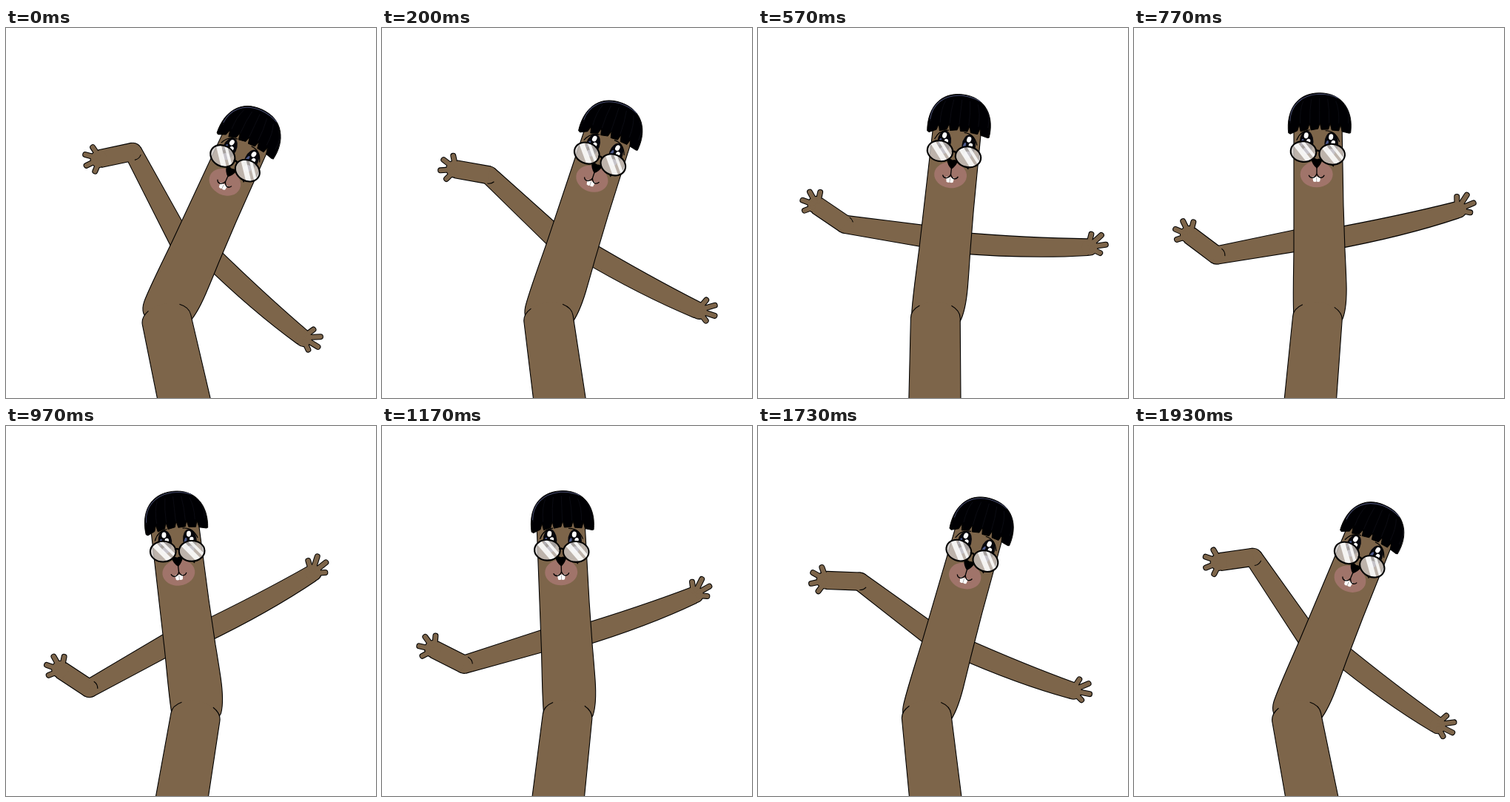
An HTML page with a canvas for the animation above (1960 ms loop, 500 px wide and 500 px high).

```html
<!DOCTYPE html>
<html lang="en">
<head>
<meta charset="utf-8">
<title>Waving tube dancer</title>
<style>
  html, body { margin: 0; width: 100%; height: 100%; overflow: hidden; background: #fff; }
  canvas { display: block; width: 500px; height: 500px; }
</style>
</head>
<body>
<canvas id="stage" width="500" height="500"></canvas>
<script>
const ctx = document.getElementById('stage').getContext('2d');
const LOOP = 1960, TURN = 30;
const INK = '#000', SKIN = '#7d654a';
const rad = d => d * Math.PI / 180;
const shape = d => new Path2D(d);

function oval(x, y, rx, ry = rx, tilt = 0) {
  const p = new Path2D();
  p.ellipse(x, y, rx, ry, rad(tilt), 0, 7);
  return p;
}
function fill(path, color) {
  ctx.fillStyle = color;
  ctx.fill(path);
}
function line(path, width, color = INK) {
  ctx.strokeStyle = color;
  ctx.lineWidth = width;
  ctx.stroke(path);
}

// u swings 0..30..0; lag separates the way out from the way back.
const rightArm = (u, lag) => ({
  side: 1,
  x: 288 + 0.3 * u - 0.02 * u * u,
  y: 318 - 1.6 * u,
  segments: [{ angle: 41.6 - 2.42 * u + 1.5 * lag, len: 151 + 8 * lag, from: 27.5, to: 21.5, bow: 3 }],
  hand: { palm: 10.5, first: -78, step: 34, reach: 18, bulge: 7 }
});
const leftArm = (u, lag) => ({
  side: -1,
  x: 230.5 - 0.63 * u,
  y: 278 - 0.65 * u + 0.047 * u * u,
  segments: [
    { angle: -62 + 3.15 * u, len: 103.5 + 22 * (u / 17 - 1) ** 2, from: 29, to: 23, bow: 0 },
    { angle: 12 - 3.07 * u + 0.053 * u * u - 9.5 * lag, len: 45, from: 23, to: 23, bow: 0 }
  ],
  hand: { palm: 11, first: -68, step: 41, reach: 18.5, bulge: 3 }
});

function paint(path, inked) {
  if (inked) line(path, 2.2);
  else fill(path, SKIN);
}

function drawArm({ side, x, y, segments, hand }) {
  // All outlines first, then all skin, so the parts merge.
  for (const inked of [true, false]) {
    ctx.save();
    ctx.translate(x, y);
    ctx.scale(side, 1);
    let turn = 0;
    segments.forEach(({ angle, len, from, to, bow }, n) => {
      const start = n ? 0 : -20, mid = len / 2, w = (from + to) / 4;
      const bend = angle - turn;
      ctx.rotate(rad(bend));
      turn = angle;
      if (n) paint(oval(0, 0, 11.4), inked);
      paint(shape(`M${start} ${-from / 2}Q${mid} ${bow - w} ${len} ${-to / 2}V${to / 2}` +
        `Q${mid} ${bow * 2 + w} ${start} ${from / 2}Z`), inked);
      if (n && !inked) drawCrease(bend);
      ctx.translate(len, 0);
    });
    drawHand(hand, inked);
    ctx.restore();
  }
}

function drawHand({ palm, first, step, reach, bulge }, inked) {
  paint(oval(2, 0, palm), inked);
  ctx.lineCap = 'round';
  for (let i = 0; i < 4; i++) {
    const a = rad(first + i * step), r = reach + bulge * Math.sin(Math.PI * i / 3);
    const x = r * Math.cos(a), y = r * Math.sin(a);
    line(shape(`M${x * 0.3} ${y * 0.3}L${x} ${y}`), inked ? 8 : 5.9, inked ? INK : SKIN);
  }
}

function drawCrease(bend) {
  const s = Math.sign(bend) || 1;
  const arc = new Path2D();
  arc.arc(0, 0, 11.4, rad(90 * s), rad(s * (90 + Math.min(58, 15 + Math.abs(bend)))), s < 0);
  line(arc, 1.1);
}

const TORSO = shape('M216 128L216 300C215.5 340 214.5 372 216 390Q217 400 222 405Q230 412 249 412' +
  'Q272 408 282 393C287 380 287.5 362 287 345Q286 318 285 300L283 240L281 128Z');
const LEGS = shape('M-35.3 22L-33.4 -103A33.4 22 0 0 1 33.4 -103L35.3 22');
const LEG_LINES = shape('M-35.3 22L-33.4 -103A33.4 22 0 0 1 -21.5 -119.9M21.5 -119.9A33.4 22 0 0 1 33.4 -103L35.3 22');
const HAIR = makeHair();

function makeHair() {
  const locks = 6, left = 209, right = 293, width = (right - left) / locks;
  const hem = x => 137.5 + 6 * ((x - 251) / 42) ** 2;
  let d = `M${left} 143C206 114 219 89 251 89C283 89 297 114 ${right} 143`;
  for (let i = 0; i < locks; i++) {
    const x = right - i * width, next = x - width;
    d += `L${x - 2} ${hem(x)}L${next + 2.5} ${hem(next) + 1}`;
    if (i < locks - 1) d += `L${next + 0.5} ${hem(next) - 8}`;
  }
  return shape(d + 'Z');
}

function drawHair() {
  fill(HAIR, '#000003');
  line(HAIR, 0.9);
  for (let i = -3; i <= 3; i++) {
    const x = 251 + i * 11;
    line(shape(`M${x} ${96 + i * i}Q${x + i * 2.5} 112 ${x + i * 2} 130`), 0.6, '#12131c');
  }
  line(shape('M211 127C212 107 225 92 250 90.5Q265 90.5 276 96'), 1, '#454a6c');
}

function drawEye(x, y) {
  fill(oval(x, y + 5, 9.3, 15), '#07070c');
  fill(oval(x - 6, y + 6, 1.7, 5, 15), '#4d5a8c');
  fill(oval(x, y + 17, 5, 4.5), '#a9b5e2');
  fill(oval(x - 0.5, y - 3.5, 3, 4, 10), '#fff');
  fill(oval(x + 2.5, y + 4, 2.7, 3, 10), '#fff');
}

function drawLens(x, y) {
  const lens = oval(x, y, 17.3, 13.9, 5);
  ctx.save();
  ctx.clip(lens);
  fill(lens, 'rgba(205,199,195,.8)');
  for (const [shift, width] of [[-4, 9], [10, 5]]) {
    const left = x + shift - 15;
    fill(shape(`M${left} ${y - 15}h${width}l24 30h${-width}Z`), 'rgba(255,255,255,.85)');
  }
  ctx.restore();
  line(lens, 2.1);
}

function drawFace() {
  fill(oval(247, 199, 22, 17.5), '#a0746a');
  drawEye(233.5, 150);
  drawEye(267, 152);
  line(shape('M220 153Q225 140 238 139M259 140Q273 140 278 155'), 1.2);
  fill(shape('M264 184L271 185L270 189Z'), INK);
  drawLens(229.3, 168.3);
  drawLens(268, 172);
  line(shape('M245.5 168Q248 165.5 251.5 168.5'), 2.4);
  fill(shape('M240 179Q243 176 247.5 178.5Q252 176.5 254.5 180Q253 186 247.5 191Q241 186 240 179Z'), INK);
  fill(shape('M241.5 202L252.5 202L251.5 208.5Q249 210 247 208.5Q245 210 242.5 208.5Z'), '#fff');
  line(shape('M247 203V208.5'), 0.6, '#777');
  line(shape('M247.3 189V198M236.5 200Q238 204 242 203.5Q246 202.5 247.3 198Q249 203 252.5 203.5Q256 203.5 257.5 200'), 1.3);
}

function drawBody(u) {
  ctx.save();
  ctx.translate(218.8 + 1.313 * u, 379 + 0.62 * u - 0.0155 * u * u);
  ctx.rotate(rad(25 - 1.087 * u));
  ctx.translate(-249, -385);
  fill(TORSO, SKIN);
  line(TORSO, 1.1);
  ctx.translate(-0.3, -1.3);
  drawFace();
  drawHair();
  ctx.restore();

  ctx.save();
  ctx.translate(239, 495);
  ctx.rotate(rad(-12.3 + 0.75 * u));
  fill(LEGS, SKIN);
  line(LEG_LINES, 1.1);
  ctx.restore();
}

function draw(ms) {
  // Thirty steps a second, with starts rounded to 10 ms.
  const k = Math.floor((Math.floor(ms / 10) * 10 + 5) * 3 / 100);
  const u = TURN - Math.abs(TURN - k);
  const lag = Math.sin(Math.PI * k / TURN);
  ctx.fillStyle = '#fff';
  ctx.fillRect(0, 0, 500, 500);
  ctx.lineJoin = 'round';
  drawArm(leftArm(u, lag));
  drawArm(rightArm(u, lag));
  drawBody(u);
}

const begin = performance.now();
function tick() {
  draw((performance.now() - begin) % LOOP);
  requestAnimationFrame(tick);
}
tick();
</script>
</body>
</html>
```
